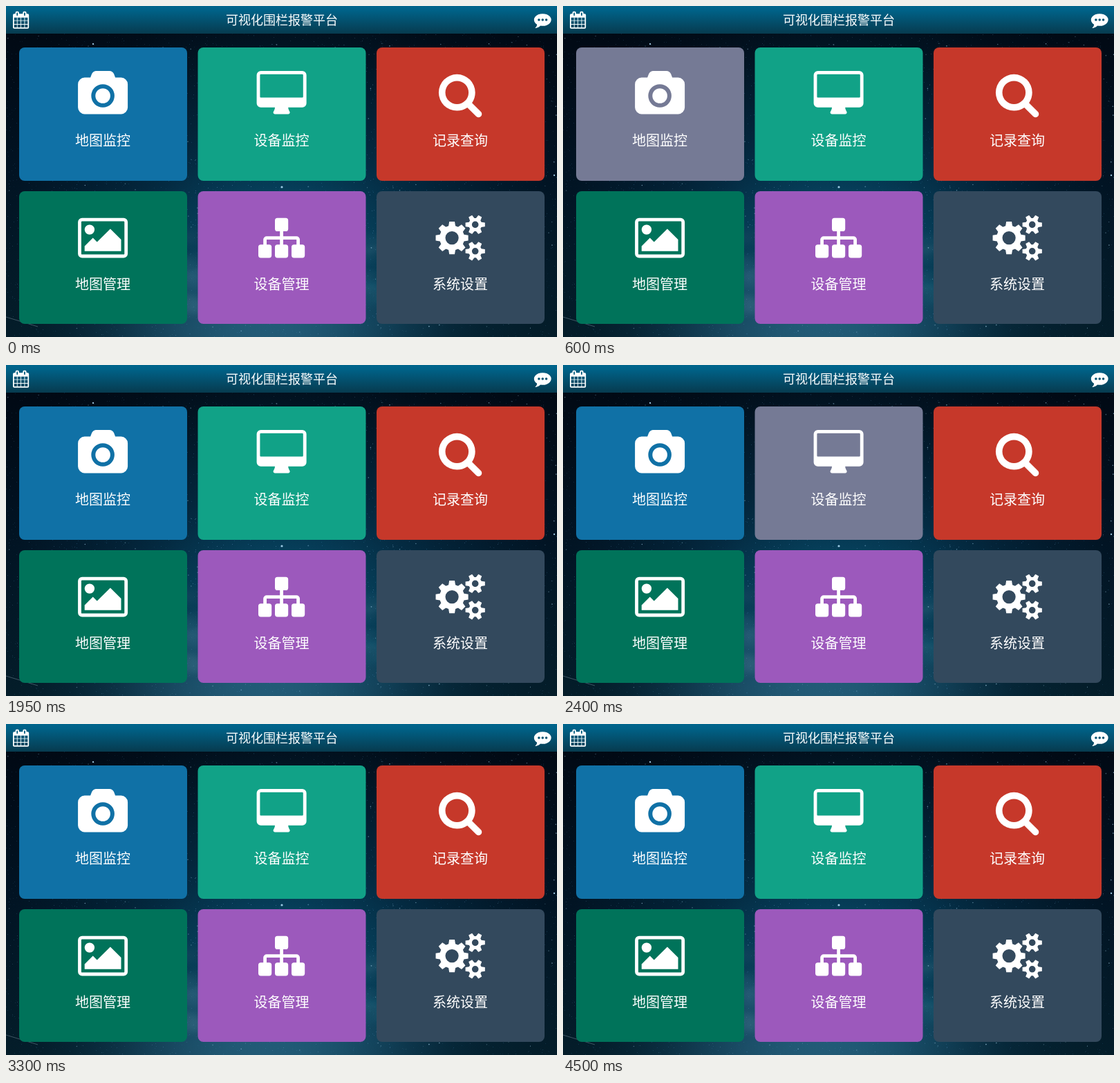
Recreate the animation shown at these times as an HTML page with a canvas. Size 797 by 479 pixels, loop 4.65 s.

```html
<!DOCTYPE html>
<html lang="zh-CN">
<head>
<meta charset="utf-8">
<title>可视化围栏报警平台</title>
<style>
html, body { margin: 0; width: 100%; height: 100%; overflow: hidden; background: #010a14; }
canvas, svg { position: absolute; left: 0; top: 0; width: 797px; height: 479px; display: block; }
text { font-family: "Noto Sans CJK SC", "Noto Sans CJK", sans-serif; font-weight: 350; fill: #fff; text-anchor: middle; }
</style>
</head>
<body>
<canvas id="sky" width="797" height="479"></canvas>
<svg id="ui" viewBox="0 0 797 479">
  <defs>
    <linearGradient id="bar" x1="0" y1="0" x2="0" y2="1">
      <stop offset="0" stop-color="#00658c"/>
      <stop offset=".15" stop-color="#006288"/>
      <stop offset="1" stop-color="#073b4f"/>
    </linearGradient>
  </defs>
  <rect width="797" height="40" fill="url(#bar)"/>
  <text id="title" x="399" y="27" font-size="18"></text>
  <g id="head" fill="#fff" fill-rule="evenodd"></g>
  <g id="menu"></g>
</svg>
<script>
const W = 797, H = 479, LOOP = 4650;
const $ = id => document.getElementById(id);

function randomizer(seed) {
  return () => {
    seed = (seed + 0x6D2B79F5) | 0;
    let v = Math.imul(seed ^ (seed >>> 15), 1 | seed);
    v = (v + Math.imul(v ^ (v >>> 7), 61 | v)) ^ v;
    return ((v ^ (v >>> 14)) >>> 0) / 4294967296;
  };
}

// ---- night sky ----
function paintSky() {
  const c = $('sky').getContext('2d'), rnd = randomizer(41);
  const glow = (x, y, rx, ry, rgb, alpha) => {
    c.save();
    c.translate(x, y);
    c.scale(rx, ry);
    const g = c.createRadialGradient(0, 0, 0, 0, 0, 1);
    for (let i = 0; i <= 6; i++) {
      const k = Math.cos(i / 6 * Math.PI) / 2 + .5;
      g.addColorStop(i / 6, `rgba(${rgb},${alpha * k})`);
    }
    c.fillStyle = g;
    c.fillRect(-1, -1, 2, 2);
    c.restore();
  };
  const base = c.createLinearGradient(0, 0, 0, H);
  base.addColorStop(0, '#010812');
  base.addColorStop(.5, '#011120');
  base.addColorStop(1, '#041c28');
  c.fillStyle = base;
  c.fillRect(0, 0, W, H);

  glow(400, 330, 470, 400, '6,62,92', .8);
  glow(400, 365, 270, 190, '10,94,124', .55);
  glow(370, 480, 330, 130, '52,112,142', .62);
  glow(390, 362, 75, 34, '62,140,185', .6);
  glow(270, 396, 42, 30, '80,130,160', .3);
  glow(510, 412, 100, 34, '40,125,150', .3);
  glow(725, 386, 55, 28, '80,100,115', .32);
  glow(660, 400, 130, 45, '40,85,95', .3);
  glow(190, 370, 75, 34, '4,20,35', .4);
  glow(450, 375, 60, 26, '6,40,58', .25);

  // broken cloud band along the lower part
  for (let i = 0; i < 200; i++) {
    const x = 110 + rnd() * 600, y = 385 + (rnd() - .5) * 110 - Math.max(0, x - 480) * .1;
    const r = 10 + rnd() * 26;
    glow(x, y, r * 1.4, r * .75, rnd() < .5 ? '92,142,165' : '2,25,42', .05 + rnd() * .06);
  }

  for (let i = 0; i < 3300; i++) {
    const x = rnd() * W, y = 40 + rnd() * 439;
    const near = Math.exp(-((x - 410) ** 2 / 90000 + (y - 300) ** 2 / 50000));
    const a = (.1 + rnd() * .28) * (.55 + near * .7);
    c.fillStyle = `rgba(${rnd() < .25 ? '125,165,210' : '65,135,185'},${a})`;
    c.fillRect(x | 0, y | 0, 1, 1);
  }
  const dot = (x, y, r, a) => {
    c.fillStyle = `rgba(175,220,245,${a})`;
    c.beginPath();
    c.arc(x, y, r, 0, 7);
    c.fill();
  };
  for (let i = 0; i < 330; i++) {
    const x = W * Math.pow(rnd(), .8);
    dot(x, 42 + rnd() * 435, .45 + rnd() * .45, .25 + rnd() * .45);
  }
  const bright = [[399, 262], [724, 80], [656, 236], [741, 86], [774, 155], [564, 70], [588, 172],
    [594, 210], [704, 325], [609, 427], [547, 450], [126, 55], [687, 121], [635, 141], [715, 70],
    [454, 81], [793, 245], [330, 197], [431, 160], [258, 101], [545, 88], [711, 407], [668, 247]];
  bright.forEach(([x, y], i) => dot(x, y, i ? 1.15 : 1.6, .9));

  const streak = (x1, y1, x2, y2, a) => {
    c.strokeStyle = `rgba(150,170,185,${a})`;
    c.lineWidth = 1;
    c.beginPath();
    c.moveTo(x1, y1);
    c.lineTo(x2, y2);
    c.stroke();
  };
  streak(0, 450, 46, 464, .4);
  streak(335, 358, 352, 365, .5);
  streak(405, 196, 413, 168, .2);
}

// ---- icons, drawn on a 1792 unit grid ----
const box = (x, y, w, h, r = 0) => r
  ? `M${x + r} ${y}h${w - 2 * r}a${r} ${r} 0 0 1 ${r} ${r}v${h - 2 * r}a${r} ${r} 0 0 1 ${-r} ${r}` +
    `h${2 * r - w}a${r} ${r} 0 0 1 ${-r} ${-r}v${2 * r - h}a${r} ${r} 0 0 1 ${r} ${-r}z`
  : `M${x} ${y}h${w}v${h}h${-w}z`;
const disc = (x, y, r) => `M${x - r} ${y}a${r} ${r} 0 1 0 ${2 * r} 0a${r} ${r} 0 1 0 ${-2 * r} 0z`;

function gear(x, y, teeth, tip, tipHalf, root, rootHalf, hole) {
  const pts = [];
  for (let i = 0; i < teeth; i++) {
    const a = i / teeth * 2 * Math.PI;
    const put = (r, half) => {
      const b = a + Math.asin(half / r);
      pts.push(`${(x + r * Math.cos(b)).toFixed(1)} ${(y + r * Math.sin(b)).toFixed(1)}`);
    };
    put(root, -rootHalf);
    put(tip, -tipHalf);
    put(tip, tipHalf);
    put(root, rootHalf);
  }
  return `M${pts.join('L')}z` + disc(x, y, hole);
}

function calendar() {
  const tab = 'v-96a160 160 0 0 1 160-160h64a160 160 0 0 1 160 160v96';
  let d = `M192 256h128${tab}h384${tab}h128a128 128 0 0 1 128 128v1280a128 128 0 0 1-128 128` +
    'h-1408a128 128 0 0 1-128-128v-1280a128 128 0 0 1 128-128z';
  for (const [x, w] of [[192, 288], [544, 320], [928, 320], [1312, 288]])
    for (const [y, h] of [[640, 288], [992, 320], [1376, 288]]) d += box(x, y, w, h);
  return d + box(448, 128, 128, 320, 32) + box(1216, 128, 128, 320, 32);
}

const icons = {
  camera: 'M1664 256q106 0 181 75t75 181v896q0 106-75 181t-181 75h-1408q-106 0-181-75t-75-181v-896' +
    'q0-106 75-181t181-75h224l51-136q19-49 69.5-84.5t103.5-35.5h512q53 0 103.5 35.5t69.5 84.5l51 136z' +
    disc(960, 960, 448) + disc(960, 960, 288),
  screen: box(0, 0, 1920, 1408, 160) + box(128, 128, 1664, 896, 32) +
    'M704 1408q0 38-16 78t-32 70-16 44q0 26 19 45t45 19h512q26 0 45-19t19-45q0-13-16-43.5t-32-71-16-77.5z',
  search: disc(768, 832, 448) +
    'M1728 1664q0 52-38 90t-90 38q-54 0-90-38l-343-342q-179 124-399 124-143 0-273.5-55.5t-225-150' +
    '-150-225-55.5-273.5 55.5-273.5 150-225 225-150 273.5-55.5 273.5 55.5 225 150 150 225 55.5 273.5' +
    'q0 220-124 399l343 343q37 37 37 90z',
  picture: box(0, 128, 1920, 1536, 160) + box(128, 256, 1664, 1280, 32) + disc(448, 576, 192) +
    'M1664 960v448h-1408v-192l320-320 160 160 512-512z',
  tree: box(640, 128, 512, 512, 96) + [0, 640, 1280].map(x => box(x, 1152, 512, 512, 96)).join('') +
    'M832 640h128v192h512q52 0 90 38t38 90v192h-128v-192h-512v192h-128v-192h-512v192h-128v-192' +
    'q0-52 38-90t90-38h512z',
  gears: gear(640, 896, 8, 636, 104, 482, 132, 256) +
    [384, 1408].map(y => gear(1536, y, 6, 384, 76, 256, 98, 128)).join(''),
  calendar: calendar(),
  chat: 'M1792 896q0 174-120 321.5t-326 233-450 85.5q-110 0-211-18-173 173-435 229-52 10-86 13-12 1-22-6' +
    't-13-18q-4-15 20-37 5-5 23.5-21.5t25.5-23.5 23.5-25.5 24-31.5 20.5-37 20-48 14.5-57.5 12.5-72.5' +
    'q-146-90-229.5-216.5t-83.5-269.5q0-174 120-321.5t326-233 450-85.5 450 85.5 326 233 120 321.5z' +
    [512, 896, 1280].map(x => disc(x, 896, 128)).join(''),
  back: 'M640 1082v70q0 42-39 59-13 5-25 5-27 0-45-19l-512-512q-19-19-19-45t19-45l512-512q29-31 70-14' +
    ' 39 17 39 59v69l-397 398q-19 19-19 45t19 45zM1792 1140q0 58-17 133.5t-38.5 138-48 125-40.5 90.5' +
    'l-20 40q-8 17-28 17-6 0-9-1-25-8-23-34 43-400-106-565-64-71-170.5-110.5t-267.5-52.5v251' +
    'q0 42-39 59-13 5-25 5-27 0-45-19l-512-512q-19-19-19-45t19-45l512-512q29-31 70-14 39 17 39 59v262' +
    'q411 28 599 221 169 173 169 509z'
};
const icon = (name, x, y, scale, id = name) =>
  `<path id="${id}" d="${icons[name]}" transform="translate(${x} ${y}) scale(${scale})"/>`;

// ---- menu ----
const PRESSED = '#757a95';
const tiles = [
  ['地图监控', '#1071a6', 'camera', 1920],
  ['设备监控', '#11a287', 'screen', 1920],
  ['记录查询', '#c6382a', 'search', 1792],
  ['地图管理', '#00735a', 'picture', 1920],
  ['设备管理', '#9c59bc', 'tree', 1792],
  ['系统设置', '#33495d', 'gears', 1920]
];

function build() {
  $('head').innerHTML = icon('calendar', 9.1, 7.8, .01393) + icon('back', 9, 8, .0139) +
    icon('chat', 763.8, 7.6, .01385);
  $('menu').innerHTML = tiles.map(([label, color, name, width], i) => {
    const x = 19 + (i % 3) * 258.5, y = i < 3 ? 60 : 268, mid = x + 121.5;
    return `<rect id="tile${i}" x="${x}" y="${y}" width="243" height="${i < 3 ? 193 : 192}" rx="8"/>` +
      `<g fill="#fff" fill-rule="${name === 'tree' ? 'nonzero' : 'evenodd'}">` +
      icon(name, mid - width * .01875 - .4, y + 34, .0375) + '</g>' +
      `<text x="${mid - .5}" y="${y + 141.5}" font-size="20">${label}</text>`;
  }).join('');
}

// start time, open page, pressed tile
const steps = [
  [0, -1, -1], [600, -1, 0], [750, 0, -1],
  [1950, -1, -1], [2400, -1, 1], [2550, 1, -1],
  [3300, -1, -1]
];

function render(t) {
  const [, page, pressed] = steps.filter(s => s[0] <= t).pop();
  const home = page < 0;
  const show = (id, on) => $(id).setAttribute('visibility', on ? 'visible' : 'hidden');
  show('menu', home);
  show('calendar', home);
  show('back', !home);
  $('title').textContent = home ? '可视化围栏报警平台' : tiles[page][0];
  tiles.forEach((tile, i) => $('tile' + i).setAttribute('fill', i === pressed ? PRESSED : tile[1]));
}

paintSky();
build();
render(0);
const start = performance.now();
function tick() {
  render((performance.now() - start) % LOOP);
  requestAnimationFrame(tick);
}
requestAnimationFrame(tick);
</script>
</body>
</html>
```
